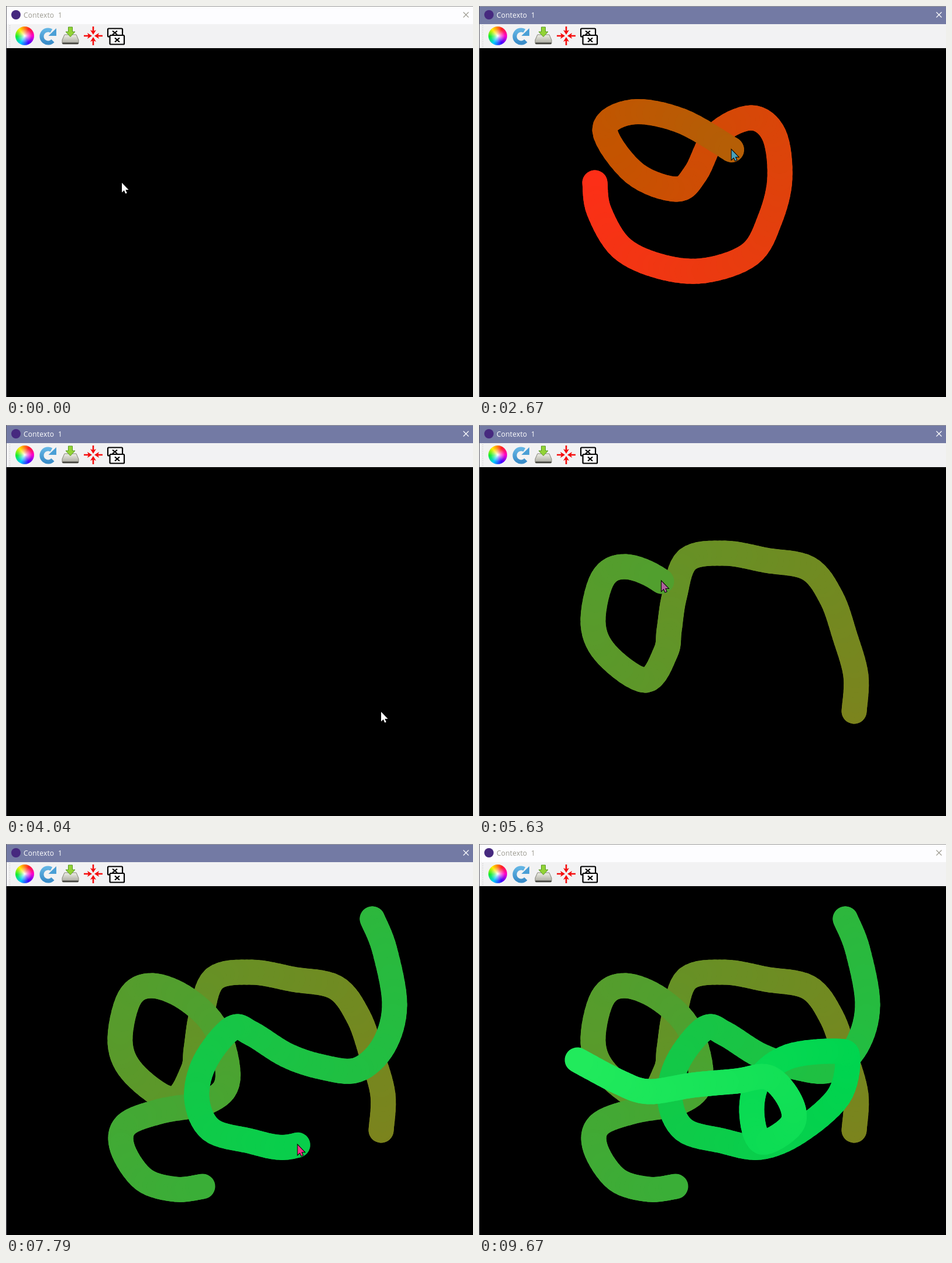
Write an HTML page with a canvas that moves like this. It is 798x668 px and loops after 9.71 s.

```html
<!DOCTYPE html>
<html lang="es">
<head>
<meta charset="utf-8">
<title>Contexto</title>
<style>
  html, body { margin: 0; width: 100%; height: 100%; overflow: hidden; background: #000; }
  #stage { position: absolute; left: 0; top: 0; width: 798px; height: 668px; overflow: hidden; }
  #stage > * { position: absolute; left: 0; top: 0; }
  #bar { width: 798px; height: 31px; background: #737aa4; color: #fff; }
  #bar.idle { background: #fdfdff; color: #9c9a90; }
  #bar span {
    position: absolute; left: 30px; top: 8px; white-space: pre;
    font: 12px/16px "Open Sans", "Noto Sans", sans-serif; letter-spacing: .2px;
  }
  #bar svg { position: absolute; left: 0; top: 0; }
  #stage > #tools { top: 31px; width: 798px; height: 41px; background: #f2f2f3; }
  #stage > #wheel {
    left: 16px; top: 35px; width: 32px; height: 32px; border-radius: 50%;
    background:
      radial-gradient(circle, #fff 0, #fff8 22%, #fff0 55%),
      conic-gradient(from 30deg, #f22, #f0c 60deg, #40f 120deg, #0cf 180deg, #1e3 235deg, #fe0 290deg, #f22);
  }
  #edge { width: 1px; height: 668px; background: #60606a; }
</style>
</head>
<body>
<div id="stage">
  <canvas id="pad" width="798" height="668"></canvas>
  <div id="bar" class="idle">
    <svg width="798" height="31">
      <path d="M0 .5H798" stroke="#9a9a9a"/>
      <circle cx="17" cy="15" r="8" fill="#46297f"/>
      <path d="M781.500 10.500l9 9m0-9l-9 9" stroke="currentColor" stroke-width="1.2"/>
    </svg>
    <span>Contexto  1</span>
  </div>
  <div id="tools"></div>
  <div id="wheel"></div>
  <svg width="220" height="72">
    <defs>
      <linearGradient id="blue" x2="0" y2="1"><stop stop-color="#62b4e4"/><stop offset="1" stop-color="#3a8cc8"/></linearGradient>
      <linearGradient id="tray" x2="0" y2="1"><stop stop-color="#eeeee6"/><stop offset="1" stop-color="#a5a59a"/></linearGradient>
      <path id="dart" d="M149 49l-5-8 3.700 1.500V35h2.600v7.500L154 41z"/>
    </defs>
    <path d="M6.500 33V70" stroke="#bcbcbc" stroke-dasharray="1 2"/>
    <path d="M80 59.500A11 11 0 1 1 77.500 42.500" fill="none" stroke="url(#blue)" stroke-width="7"/>
    <path d="M86 38V51H72.500z" fill="#4a9fd6"/>
    <path d="M100 49H120L124 58V63Q124 65 122 65H98Q96 65 96 63V58z" fill="url(#tray)" stroke="#85857a"/>
    <path d="M96.500 62.500H123.500V65H96.500z" fill="#454540"/>
    <path d="M106.500 36H113.500V44H118L110 52.500 102 44H106.500z" fill="#93d336" stroke="#549a20"/>
    <g fill="#f50d0d">
      <use href="#dart"/>
      <use href="#dart" transform="rotate(90 149 51)"/>
      <use href="#dart" transform="rotate(180 149 51)"/>
      <use href="#dart" transform="rotate(270 149 51)"/>
    </g>
    <g fill="#fff" stroke="#000" stroke-width="2.200">
      <rect x="174" y="38.500" width="25" height="14" rx="1.500"/>
      <rect x="177.500" y="50" width="24.500" height="15.500" rx="1.500"/>
      <path d="M182 42.500l8 6.500m0-6.500l-8 6.500M186 54.500l8 7m0-7l-8 7"/>
    </g>
  </svg>
  <div id="edge"></div>
</div>
<script>
const LOOP = 9710, CLEAR = 4040, WIDTH = 43, STEPS = 8;
const pad = document.getElementById('pad').getContext('2d');
const bar = document.getElementById('bar');
const arrow = new Path2D('M0 0V16.500L3.800 13 6.200 18.500 8.700 17.500 6.300 12H11.500z');

// Each stroke runs at an even speed along a smooth curve through a few key points.
const strokes = [
  stroke(500, 2670, `198,302 205,350 243,413 310,445 385,452 463,424 497,365 514,295 504,220
    465,191 405,220 370,286 337,313 265,285 215,212 262,181 345,196 431,245`),
  stroke(2670, 4010, '431,245 519,370 430,532 130,520 310,614 641,490'),
  stroke(4380, 6320, `641,489 644,428 625,360 602,295 563,245 490,231 420,219 356,230 334,292
    325,350 319,388 285,436 220,394 195,340 211,263 250,242 309,265 360,318 379,402 345,440
    262,457 205,480 199,520 235,573 290,590 336,585`),
  stroke(6710, 9030, `626,128 647,181 664,275 645,345 600,386 540,381 480,361 420,324 386,315
    340,372 326,435 350,488 415,507 480,518 545,492 614,432 630,367 610,354 530,363 480,400
    466,457 483,509 534,480 532,440 495,399 440,405 365,412 290,423 240,407 168,369`)
];
const track = [...strokes.flat(), { t: 9390, x: 4, y: 662 }];

function spline(a, b, c, d, u) {
  return b + u / 2 * (c - a + u * (2 * a - 5 * b + 4 * c - d + u * (3 * (b - c) + d - a)));
}

function stroke(start, end, text) {
  const keys = text.split(/\s+/).map(p => p.split(',').map(Number));
  const last = keys.length - 1;
  const key = i => keys[Math.max(0, Math.min(last, i))];
  const dots = [];
  let length = 0;
  for (let n = 0; n <= last * STEPS; n++) {
    const i = Math.floor(n / STEPS), u = n / STEPS - i;
    const [x, y] = [0, 1].map(k => spline(key(i - 1)[k], key(i)[k], key(i + 1)[k], key(i + 2)[k], u));
    if (n) length += Math.hypot(x - dots[n - 1].x, y - dots[n - 1].y);
    dots.push({ x, y, length });
  }
  return dots.map(d => ({ x: d.x, y: d.y, t: start + (end - start) * d.length / length }));
}

function place(dots, t) {
  const i = dots.findIndex(d => d.t > t);
  if (i < 1) return i ? dots[dots.length - 1] : dots[0];
  const a = dots[i - 1], b = dots[i], u = (t - a.t) / (b.t - a.t);
  return { x: a.x + (b.x - a.x) * u, y: a.y + (b.y - a.y) * u };
}

// Every channel drifts at its own rate and bounces at zero.
function ink(t) {
  const s = t / 1000;
  return [270 - 33.5 * s, 35 + 22 * s, 13.5 * s - 30].map(Math.abs);
}

const rgb = c => `rgb(${c.map(Math.round)})`;

function drawStroke(dots, t) {
  if (t < dots[0].t) return;
  let from = dots[0];
  for (const dot of dots) {
    const to = dot.t <= t ? dot : place(dots, t);
    pad.strokeStyle = rgb(ink(Math.min(dot.t, t)));
    pad.beginPath();
    pad.moveTo(from.x, from.y);
    pad.lineTo(to.x, to.y);
    pad.stroke();
    if (dot.t > t) break;
    from = to;
  }
}

function drawCursor(t) {
  const { x, y } = place(track, t);
  const down = strokes.some(s => t >= s[0].t && t <= s[s.length - 1].t);
  const [r, g, b] = ink(t);
  pad.save();
  pad.translate(x, y);
  pad.lineWidth = 2;
  pad.lineJoin = 'miter';
  pad.strokeStyle = '#000';
  pad.stroke(arrow);
  pad.fillStyle = down ? rgb([255 - r, 255 - g, .75 * (255 - b)]) : '#fff';
  pad.fill(arrow);
  pad.restore();
}

function frame() {
  const t = performance.now() % LOOP;
  bar.className = t < 130 || t >= 9420 ? 'idle' : '';
  pad.fillStyle = '#000';
  pad.fillRect(0, 0, 798, 668);
  pad.lineWidth = WIDTH;
  pad.lineCap = pad.lineJoin = 'round';
  for (const s of strokes) {
    if (t < CLEAR || s[0].t > CLEAR) drawStroke(s, t);
  }
  if (t < 9400) drawCursor(t);
  requestAnimationFrame(frame);
}
frame();
</script>
</body>
</html>
```
